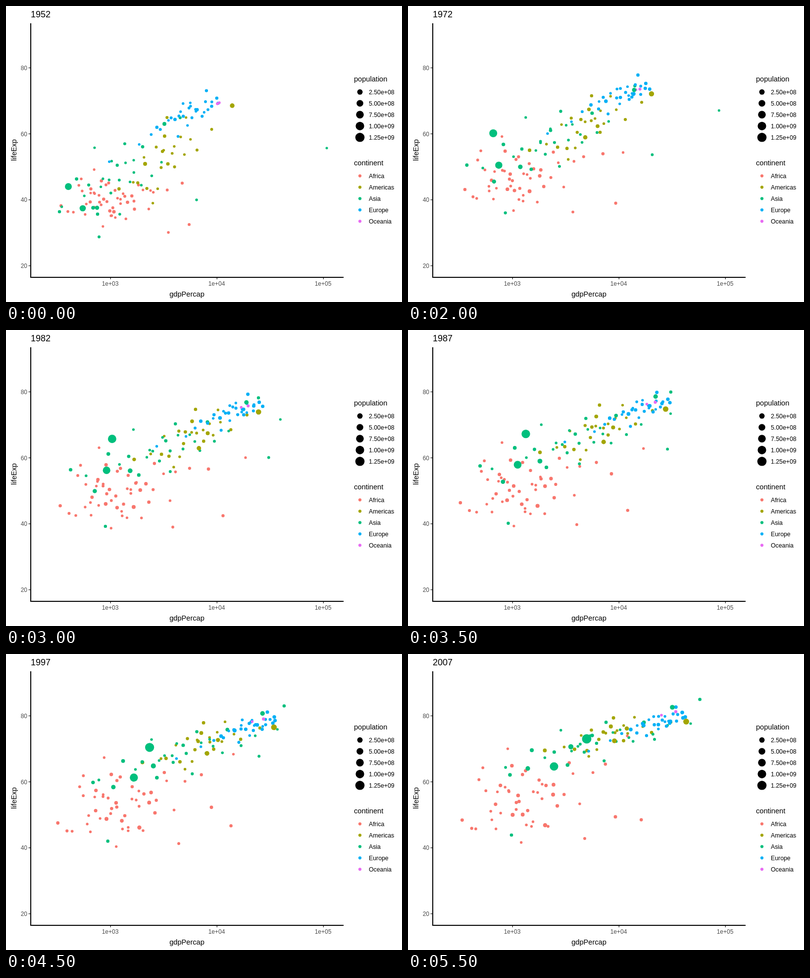
An HTML page that plays this animation: 800x600 px, repeating every 6 s.

```html
<!DOCTYPE html>
<html lang="en">
<head>
<meta charset="utf-8">
<title>lifeExp by gdpPercap</title>
<style>
  html, body { margin: 0; width: 100%; height: 100%; overflow: hidden; background: #fff; }
  svg { display: block; width: 800px; height: 600px; font-family: "Liberation Sans", Arial, sans-serif; }
  .tick { font-size: 12px; fill: #4d4d4d; }
  .key { font-size: 12.3px; }
  .name { font-size: 14.6px; }
  .year { font-size: 18px; }
</style>
</head>
<body>
<svg id="chart" viewBox="0 0 800 600"></svg>
<script>
const STEP_MS = 500, STEPS = 12;
const COLORS = {
  Africa: '#F8766D', Americas: '#A3A500', Asia: '#00BF7D', Europe: '#00B0F6', Oceania: '#E76BF3'
};

// First and last cloud: mean x, mean y, spread along x, slope, spread around the slope
const CLOUDS = {
  Africa: { n: 48, skew: 0.12, from: [208, 394, 48, -0.1, 25], to: [238, 292, 68, -0.3, 42] },
  Americas: { n: 22, skew: 0, from: [322, 306, 44, -0.6, 34], to: [403, 165, 56, -0.24, 16] },
  Asia: { n: 24, skew: 0.03, from: [225, 342, 52, -0.55, 36], to: [383, 176, 88, -0.28, 19] },
  Europe: { n: 30, skew: -0.2, from: [362, 222, 45, -0.45, 14], to: [502, 141, 42, -0.28, 9] }
};

// Dots that stand out: population in millions, then points evenly spaced in time
const NOTABLE = [
  { group: 'Africa', pop: 14, path: [[356, 359], [408, 277], [419, 330]] },
  { group: 'Africa', pop: 1, path: [[292, 374], [488, 268], [443, 166]] },
  { group: 'Africa', pop: 4, path: [[328, 459], [335, 402], [357, 374]] },
  { group: 'Africa', pop: 40, path: [[218, 417], [256, 360], [277, 347]] },
  { group: 'Asia', pop: 4, path: [[385, 393], [534, 267], [498, 173]] },
  { group: 'Asia', pop: 10, path: [[188, 468], [200, 401], [209, 367]] },
  { group: 'Asia', pop: 20, path: [[108, 417], [123, 287], [206, 245]] },
  { group: 'Oceania', pop: 8, path: [[427, 198], [541, 117]] },
  { group: 'Oceania', pop: 2, path: [[431, 196], [512, 124]] },
  { group: 'Americas', pop: 38, path: [[327, 320], [404, 215], [442, 151]] },
  { group: 'Americas', pop: 66, path: [[281, 320], [387, 246], [417, 176]] },
  { group: 'Americas', pop: 140, path: [[457, 202], [505, 169], [562, 137]] },
  { group: 'Asia', pop: 55, path: [[176, 409], [173, 336], [242, 232]] },
  { group: 'Asia', pop: 87, path: [[184, 409], [243, 295], [329, 188]] },
  { group: 'Asia', pop: 65, path: [[320, 239], [452, 174], [505, 131], [534, 108]] },
  { group: 'Asia', pop: 410, path: [[155, 410], [194, 290], [295, 228]] },
  { group: 'Asia', pop: 550, path: [[126, 366], [146, 357], [178, 236], [228, 215], [283, 191], [361, 172]] },
  { group: 'Asia', pop: 0.5, path: [[648, 288], [634, 251], [627, 203], [527, 173], [546, 154], [571, 141]] }
];
const GROWTH = 1.4;

const svg = document.getElementById('chart');

function add(tag, attrs, text) {
  const el = document.createElementNS(svg.namespaceURI, tag);
  for (const k in attrs) el.setAttribute(k, attrs[k]);
  if (text !== undefined) el.textContent = text;
  svg.append(el);
  return el;
}
const label = (cls, x, y, text, anchor = 'start') =>
  add('text', { class: cls, x, y, 'text-anchor': anchor }, text);
const line = (d, stroke, width) =>
  add('path', { d, stroke, 'stroke-width': width, fill: 'none' });
const dot = (cx, cy, r, fill) => add('circle', { cx, cy, r, fill });

// Area grows with population, as in the legend
const radius = pop => 2.37 + 7.13 * Math.sqrt(pop / 1319);
const mix = (a, b, t) => a.map((v, i) => v + (b[i] - v) * t);
const ease = t => t * (1.4 - 0.4 * t);

let seed = 1952;
function random() {
  seed = (seed * 1664525 + 1013904223) >>> 0;
  return seed / 4294967296;
}
// Evenly spread, roughly normal values
const spread = n => Array.from({ length: n }, (_, i) => {
  const p = (i + 0.5) / n;
  return Math.log(p / (1 - p)) / 1.7;
});
function shuffle(list) {
  for (let i = list.length - 1; i > 0; i--) {
    const j = Math.floor(random() * (i + 1));
    [list[i], list[j]] = [list[j], list[i]];
  }
  return list;
}

function along(path, t) {
  const pos = t * (path.length - 1);
  const i = Math.min(Math.floor(pos), path.length - 2);
  return mix(path[i], path[i + 1], pos - i);
}

const dots = [];
function addDot(group, pop, place) {
  dots.push({ el: dot(0, 0, 0, COLORS[group]), pop, place });
}

function addCloud(group, { n, skew, from, to }) {
  const across = shuffle(spread(n));
  spread(n).forEach((q, i) => {
    const u = q + skew * (q * q - 1), v = across[i];
    const phase = random() * 2 * Math.PI;
    addDot(group, 1 + 30 * random() ** 3, t => {
      const [mx, my, sx, slope, sy] = mix(from, to, ease(t));
      return [
        mx + sx * u + 4 * Math.sin(phase + 9 * t),
        my + slope * sx * u + sy * v + 2 * Math.cos(phase + 8 * t)
      ];
    });
  });
}

function drawAxes() {
  line('M50 35V551M49 550H682', '#000', 2);
  for (let i = 0; i < 4; i++) {
    const y = 526.5 - i * 133.7;
    line(`M45.5 ${y}H49`, '#333', 1.4);
    label('tick', 43, y + 4.5, 20 * (i + 1), 'end');
  }
  for (let i = 0; i < 3; i++) {
    const x = 211.3 + i * 215;
    line(`M${x} 551V554`, '#333', 1.4);
    label('tick', x - 0.8, 567, `1e+0${i + 3}`, 'middle');
  }
  label('name', 365.5, 589, 'gdpPercap', 'middle');
  label('name', 0, 0, 'lifeExp', 'middle').setAttribute('transform', 'translate(21 292) rotate(-90)');
}

function drawLegend() {
  label('name', 703, 153, 'population');
  for (let i = 0; i < 5; i++) {
    const pop = 250 * (i + 1), y = 174.3 + i * 23;
    dot(715, y, radius(pop), '#000');
    label('key', 733, y + 4.5, (pop * 1e6).toExponential(2).replace(/\+(\d)$/, '+0$1'));
  }
  label('name', 703, 323, 'continent');
  Object.entries(COLORS).forEach(([text, color], i) => {
    const y = 344.3 + i * 23;
    dot(715, y, 3.1, color);
    label('key', 733, y + 4.5, text);
  });
}

drawAxes();
drawLegend();
const year = label('year', 50, 23, '');
for (const group in CLOUDS) addCloud(group, CLOUDS[group]);
for (const { group, pop, path } of NOTABLE) addDot(group, pop, t => along(path, t));

let shown = -1;
function show(step) {
  const t = step / (STEPS - 1);
  shown = step;
  year.textContent = 1952 + 5 * step;
  for (const { el, pop, place } of dots) {
    const [x, y] = place(t);
    el.setAttribute('cx', x.toFixed(1));
    el.setAttribute('cy', y.toFixed(1));
    el.setAttribute('r', radius(pop * (1 + GROWTH * t)).toFixed(2));
  }
}

const start = performance.now();
function tick(now) {
  const step = Math.floor(Math.max(0, now - start) / STEP_MS) % STEPS;
  if (step !== shown) show(step);
  requestAnimationFrame(tick);
}
show(0);
requestAnimationFrame(tick);
</script>
</body>
</html>
```
